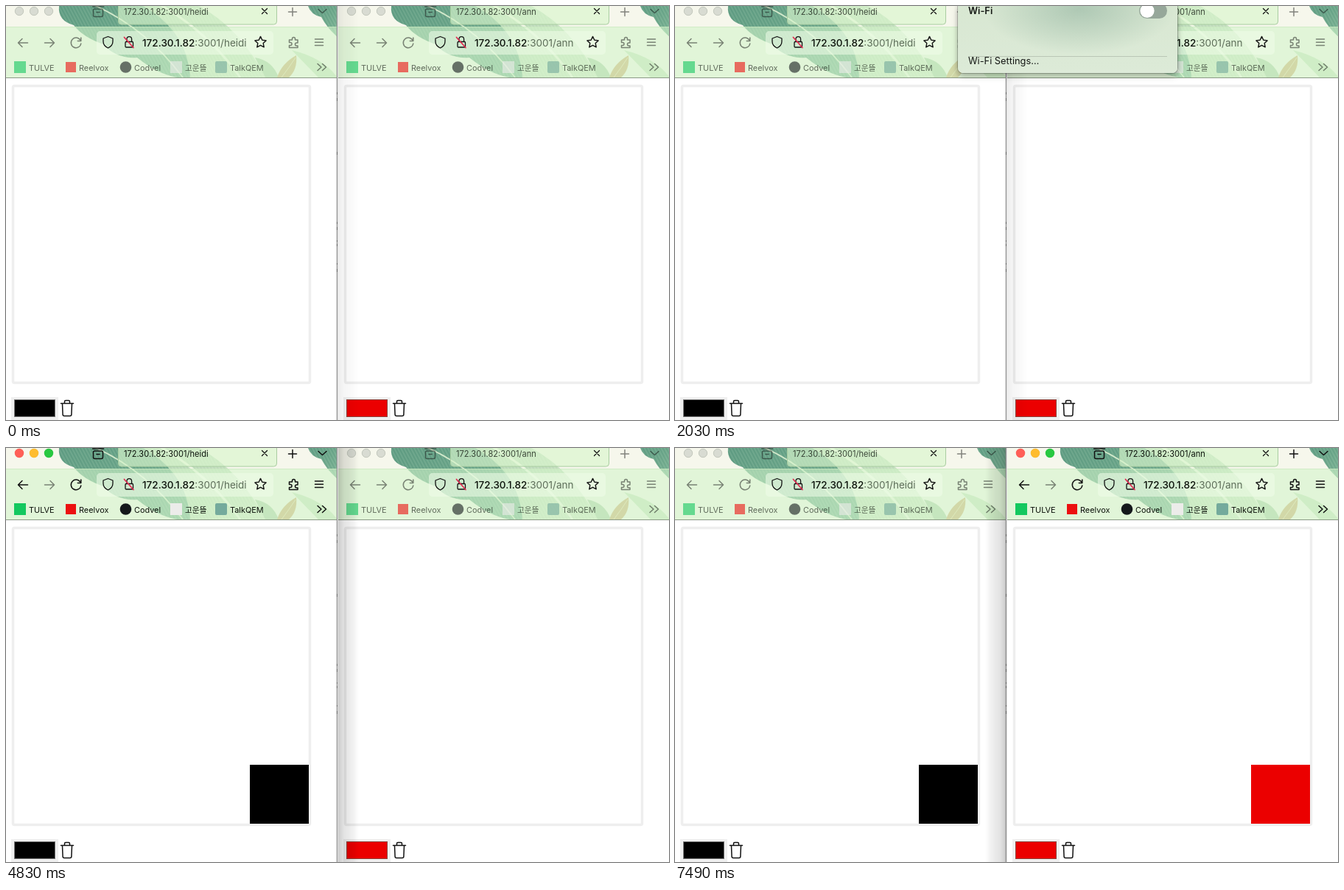
Recreate the animation shown at these times as an HTML page. Size 900 px wide and 562 px high, loop 8 s.

```html
<!DOCTYPE html>
<html lang="en">
<head>
<meta charset="utf-8">
<title>Shared pixel board</title>
<style>
@property --on { syntax: "<number>"; inherits: true; initial-value: 0; }

html, body { margin: 0; width: 900px; height: 562px; overflow: hidden; background: #fff; }
body { position: relative; font-family: Inter, "Noto Sans CJK KR", "Noto Sans CJK", sans-serif; }
svg { display: block; }
text { white-space: pre; }
#stage, .board, .shade, #menu, #foot { position: absolute; }
#stage { left: 0; top: 0; }

.line { fill: none; stroke: #111; stroke-width: 1.5; stroke-linecap: round; stroke-linejoin: round; }
.thin { stroke-width: 1.3; }
.chrome { opacity: calc(.5 + .5 * var(--on)); }
.mark { opacity: calc(.6 + .4 * var(--on)); }
.title { opacity: calc(.75 + .25 * var(--on)); }
.lit { opacity: var(--on); }
.win text { fill: #0c120b; }
.win .soft { fill: #5d6d59; font-weight: 400; }

.left { animation: leftFocus 8s linear infinite; }
.right { animation: rightFocus 8s linear infinite; }
@keyframes leftFocus {
  0%, 33.25% { --on: 0; }
  35.875%, 74.375% { --on: 1; }
  76.125%, 100% { --on: 0; }
}
@keyframes rightFocus {
  0%, 74.375% { --on: 0; }
  76.125%, 100% { --on: 1; }
}

/* Window shadows falling on the neighbour */
.shade { top: 0; width: 28px; height: 562px; }
.onRight { left: 451px; background: linear-gradient(90deg, #0003, #0000001c 28%, #0000000f 70%, #0000); animation: onRight 8s linear infinite; }
.onLeft { left: 421px; background: linear-gradient(270deg, #0003, #0000001c 28%, #0000000f 70%, #0000); animation: onLeft 8s linear infinite; }
@keyframes onRight {
  0%, 33.25% { opacity: .35; }
  35.875%, 72.624% { opacity: 1; }
  72.625%, 100% { opacity: 0; }
}
@keyframes onLeft {
  0%, 72.624% { opacity: 0; }
  72.625% { opacity: .4; }
  76.125%, 100% { opacity: 1; }
}

/* Painted cells, 40px each */
.board { top: 430px; width: 80px; height: 80px; }
.black { left: 331px; background: #000; animation: paintBlack 8s step-end infinite; }
.red { left: 782px; background: #eb0000; animation: paintRed 8s step-end infinite; }
@keyframes paintBlack {
  0% { clip-path: inset(0 80px 80px 0); }
  46.375% { clip-path: inset(0 40px 40px 0); }
  51.625% { clip-path: inset(0 40px 0 0); }
  56% { clip-path: polygon(0 0, 40px 0, 40px 40px, 80px 40px, 80px 80px, 0 80px); }
  60.375%, 100% { clip-path: inset(0); }
}
@keyframes paintRed {
  0% { clip-path: inset(0 80px 80px 0); }
  80.5% { clip-path: inset(0 40px 40px 0); }
  84% { clip-path: inset(0 40px 0 0); }
  89.25% { clip-path: polygon(0 0, 40px 0, 40px 40px, 80px 40px, 80px 80px, 0 80px); }
  93.625%, 100% { clip-path: inset(0); }
}

/* Network menu */
#menu {
  left: 384px; top: 0; width: 298px; overflow: hidden; border-radius: 0 0 7px 7px;
  background:
    radial-gradient(130px 62px at 165px 4px, #aec8b4, #aec8b400) no-repeat,
    linear-gradient(#d8e7d2, #dceAd7 85px, #ececec 140px);
  box-shadow: 0 0 0 1px #00000038, 0 4px 9px #00000040, 0 3px 3px 4px #0000000a;
  animation: menuSize 8s linear infinite, menuShow 8s linear infinite;
}
#menu text { font-size: 12.8px; fill: #141714; }
#menu .head { font-size: 12px; font-weight: 600; fill: #6d776b; }
#foot { left: 0; bottom: 0; }
.sep { stroke: #00000026; stroke-width: 1; }
#body { animation: bodyFade 8s linear infinite; }
#spot { animation: spotIn 8s linear infinite; }
#known { animation: knownMove 8s linear infinite; }
#footSep { animation: footSep 8s linear infinite; }
#track { animation: track 8s linear infinite; }
#knob { animation: knob 8s linear infinite; }
@keyframes menuShow {
  0%, 13.124% { opacity: 0; }
  13.125%, 29.75% { opacity: 1; }
  32.375%, 100% { opacity: 0; }
}
@keyframes menuSize {
  0% { height: 212px; }
  15.75% { height: 212px; animation-timing-function: cubic-bezier(.65, 0, .35, 1); }
  20.125% { height: 276px; }
  22.75% { height: 276px; animation-timing-function: cubic-bezier(.65, 0, .35, 1); }
  26.75%, 100% { height: 56px; }
}
@keyframes knownMove {
  0% { transform: none; }
  15.75% { transform: none; animation-timing-function: cubic-bezier(.65, 0, .35, 1); }
  20.125%, 100% { transform: translateY(65px); }
}
@keyframes spotIn {
  0%, 17% { opacity: 0; }
  20.125%, 100% { opacity: 1; }
}
@keyframes bodyFade {
  0%, 22.75% { opacity: 1; }
  24.8%, 100% { opacity: 0; }
}
@keyframes footSep {
  0%, 22.75% { transform: none; }
  24.5%, 25.5% { transform: translateY(10px); }
  26.75%, 100% { transform: none; }
}
@keyframes track {
  0%, 22.75% { fill: #0a7cff; }
  24.5%, 100% { fill: #96a79a; }
}
@keyframes knob {
  0%, 18% { transform: none; fill: #fff; }
  20.5%, 22.75% { transform: none; fill: #e6e9ee; }
  24.5%, 100% { transform: translateX(-16px); fill: #fff; }
}
</style>
</head>
<body>
<svg id="stage" width="900" height="562">
  <defs>
    <linearGradient id="deep" x2="1" y2="1">
      <stop stop-color="#5f9c83"/><stop offset=".5" stop-color="#6ba68a"/><stop offset="1" stop-color="#7db597"/>
    </linearGradient>
    <linearGradient id="pale" x2="1" y2="1">
      <stop stop-color="#b5d6b6"/><stop offset="1" stop-color="#d9ebcd"/>
    </linearGradient>
    <pattern id="veins" width="4" height="4" patternUnits="userSpaceOnUse" patternTransform="rotate(62)">
      <path d="M0 1H4" stroke="#e6f3dc" stroke-opacity=".2"/>
      <path d="M0 3H4" stroke="#24604c" stroke-opacity=".08"/>
    </pattern>
    <path id="leaf" d="M72 0H186Q246 34 250 97H232Q205 92 178 70Q150 72 132 52Q104 42 92 26Q70 20 72 0Z"/>
    <path id="broad" d="M180 0H262Q318 30 352 97H240Q262 62 180 0Z"/>
    <path id="corner" d="M410 0H450V42Q436 30 428 15Q414 12 410 0Z"/>
  </defs>
  <g id="windows"></g>
  <path d="M449.5 0V562" stroke="#979797" stroke-width="1.6"/>
  <path d="M449.5 117v3m0 5v4m0 69v4m0 91v3m0 4v4m0 14v2m0 3v3m0 23v2m0 6v4" stroke="#6a6a6a"/>
</svg>
<div class="shade onRight"></div>
<div class="shade onLeft"></div>
<div class="board black"></div>
<div class="board red"></div>

<div id="menu">
  <svg width="298" height="276">
    <text x="14" y="11" font-weight="600">Wi-Fi</text>
    <rect id="track" x="246" y="-4" width="38" height="21" rx="10.5"/>
    <circle id="knob" cx="273" cy="6.5" r="9.6"/>
    <g id="body">
      <text x="14" y="38">Weak Security (WPA)…</text>
      <path d="M276.5 28.5l5.5 10h-11z" fill="#4f574e" stroke="#4f574e" stroke-width="1.5" stroke-linejoin="round"/>
      <path d="M276.5 31v4m0 1.5v1.3" stroke="#e4ebe1" stroke-width="1.3"/>
      <path class="sep" d="M14 49.5H284"/>
      <g id="spot">
        <text class="head" x="14" y="70">Personal Hotspot</text>
        <circle cx="27" cy="93" r="13" fill="#c9d2c7"/>
        <g class="line thin">
          <rect x="18" y="89" width="11" height="7" rx="3.5"/>
          <rect x="25" y="90.5" width="11" height="7" rx="3.5"/>
        </g>
        <text x="48" y="98">Doyu</text>
        <path d="M217.5 98v-4" stroke="#7e867d" stroke-width="3"/>
        <path d="M222.5 98v-6m4.5 6v-8m4.5 8v-10" stroke="#bcc4ba" stroke-width="3"/>
        <text x="239" y="97" style="font-size:10.8px;fill:#7e867d">LTE</text>
        <rect x="262.5" y="88.5" width="17" height="9" rx="2.5" fill="none" stroke="#838b82"/>
        <rect x="264" y="90" width="10" height="6" rx="1" fill="#646c63"/>
        <path d="M281.5 91.5v3" stroke="#838b82" stroke-width="1.5"/>
        <path class="sep" d="M14 114.5H284"/>
      </g>
      <g id="known"></g>
    </g>
  </svg>
  <svg id="foot" width="298" height="34">
    <path id="footSep" class="sep" d="M14 1.5H284"/>
    <text x="14" y="21.5">Wi-Fi Settings…</text>
  </svg>
</div>

<script>
const wifi = (y, disc, ink) => `
  <circle cx="27" cy="${y}" r="13" fill="${disc}"/>
  <g transform="translate(27 ${y + 4.5})" fill="none" stroke="${ink}" stroke-width="2">
    <path d="M-7.2 -6.2Q0 -12.5 7.2 -6.2M-4.3 -3.2Q0 -7 4.3 -3.2"/>
    <path d="M-1.9 -1.2Q0 -3 1.9 -1.2L0 .8Z" fill="${ink}" stroke="none"/>
  </g>`;

document.getElementById('known').innerHTML = `
  <text class="head" x="14" y="70">Known Networks</text>
  ${wifi(93, '#cdd2cb', '#222')}
  <text x="48" y="98">fibnet</text>
  ${wifi(125, '#0a7cff', '#fff')}
  <text x="48" y="130">HB_NoVA_5G_Crest4_7316</text>
  <rect x="272" y="124" width="9" height="7.5" rx="1.2" fill="#6e6e6e"/>
  <path d="M274 124v-2q0-2.500 2.500-2.500t2.500 2.500v2" fill="none" stroke="#6e6e6e" stroke-width="1.4"/>
  <path class="sep" d="M14 146.5H284M14 179.5H284"/>
  <text class="head" x="14" y="167">Other Networks</text>
  <path d="M278 159l4.500 4.500-4.500 4.500" fill="none" stroke="#555" stroke-width="1.4"/>`;

const veined = (id, fill) => `<use href="#${id}" fill="url(#${fill})"/><use href="#${id}" fill="url(#veins)"/>`;

const art = `
  <rect width="450" height="97" fill="#f6f7ec"/>
  ${veined('broad', 'pale')}
  <path d="M205 -4Q275 35 318 97" fill="none" stroke="#f1f7e6" stroke-width="3"/>
  ${veined('leaf', 'deep')}
  <path d="M118 -2Q190 30 240 97" fill="none" stroke="#d3e9cb" stroke-width="1.8"/>
  ${veined('corner', 'deep')}
  <path d="M338 70Q362 74 370 97H352Z" fill="#b4d3af"/>
  <path d="M368 97Q374 78 394 67Q396 86 384 97Z" fill="#d2b27a"/>
  <path d="M374 97Q384 84 393 70" fill="none" stroke="#ecdcae"/>
  <path d="M388 60Q430 70 450 97H424Z" fill="#cce4c2"/>
  <rect y="28" width="450" height="69" fill="#d3f5ca" fill-opacity=".58"/>
  <path d="M0 28.5H450" stroke="#c9e8bf" stroke-opacity=".7"/>
  <rect x="152.5" y="-6" width="215" height="31" rx="4" fill="#d9f6ce" fill-opacity=".66" stroke="#a9cda1"/>
  <rect x="123" y="34" width="240" height="32" rx="5" fill="#f1fdea" fill-opacity=".55"/>`;

const lights = ['#ff5f57', '#febc2e', '#28c840'].map((c, i) => `
  <circle cx="${18 + 20 * i}" cy="7" r="5.7" fill="#d8dbd2" stroke="#c3c8bd"/>
  <circle class="lit" cx="${18 + 20 * i}" cy="7" r="6.2" fill="${c}"/>`).join('');

const star = Array.from({ length: 10 }, (_, i) => {
  const r = i % 2 ? 3.9 : 8, a = Math.PI * (i / 5 - .5);
  return `${(345.5 + r * Math.cos(a)).toFixed(1)},${(49.4 + r * Math.sin(a)).toFixed(1)}`;
}).join(' ');

const icons = `
  <g class="chrome line">
    <rect x="118.5" y="4" width="13" height="10.5" rx="2"/>
    <path d="M117.5 1h15M123 8.5h4M383.5 8h11M389 2.5v11M424 4.5l5.5 5 5.5-5"/>
    <path d="M29.5 50h-13m5.5-5.5L16.5 50l5.5 5.5"/>
    <path d="M101 46.5a6.800 6.800 0 1 0 .8 4.500M101.8 43v4.500h-4.500"/>
    <path d="M384.5 46h4v-1.500a2 2 0 0 1 4 0V46h3.500v4h-1.500a2 2 0 0 0 0 4h1.500v2.500h-11.500v-3h1.500a2 2 0 0 0 0-4h-1.500z"/>
    <path d="M419.5 45h11m-11 4.200h11m-11 4.200h11M423 78.5l5 4.500-5 4.500M429.5 78.5l5 4.500-5 4.500"/>
  </g>
  <path class="line" opacity=".5" d="M52.5 50h13m-5.500-5.500l5.500 5.500-5.500 5.500"/>
  <g class="line thin">
    <path d="M347.5 3.5l7 7m0-7l-7 7"/>
    <path d="M138.5 41.5l6.500 2.500v4q0 6-6.500 9-6.500-3-6.500-9v-4z"/>
    <rect x="162" y="48.5" width="10.5" height="7.5" rx="1.2"/>
    <path d="M164 48v-3q0-3.300 3.300-3.300t3.300 3.300v3"/>
    <path d="M160.5 42.5l12.500 14" stroke="#e22850" stroke-width="1.7"/>
    <polygon points="${star}" stroke-width="1.4"/>
  </g>`;

const marks = `
  <g class="mark" font-size="10.9">
    <rect x="11" y="75" width="16" height="16" fill="#14c85f"/><text x="31" y="87.5">TULVE</text>
    <rect x="81" y="76" width="14" height="14" fill="#ec1010"/><text x="99" y="87.5">Reelvox</text>
    <circle cx="162.5" cy="83" r="7.8" fill="#14181b"/><text x="174" y="87.5">Codvel</text>
    <rect x="223" y="75" width="16" height="16" fill="#ececea"/><text x="243" y="87.5" font-size="10.7">고운뜰</text>
    <rect x="284" y="75" width="16" height="16" rx="2" fill="#74aa9c"/><text x="304" y="87.5">TalkQEM</text>
  </g>`;

const host = '172.30.1.82';
const page = (ink, edge) => `
  <rect x="9.5" y="108.5" width="403" height="403" rx="2" fill="#fff" stroke="#eee" stroke-width="3.5"/>
  <rect x="7" y="531" width="64" height="31" fill="#efefef"/>
  <rect x="11.5" y="534.5" width="55" height="23" fill="${ink}" stroke="${edge}"/>
  <path class="line" d="M74.5 539.500h17M79.500 539v-2q0-1.500 1.500-1.500h4q1.500 0 1.500 1.500v2M76.500 540l.6 14.500q.1 2 2 2h7.800q1.900 0 2-2l.6-14.500"/>`;

const browser = (side, x, user, ink, edge) => `
  <g class="win ${side}" transform="translate(${x} 0)">
    <svg width="449" height="97">${art}</svg>
    <path d="M0 97.5H449" stroke="#8b9a86"/>
    ${lights}${icons}${marks}
    <text class="title" x="160" y="12" font-size="11.05">${host}:3001/${user}</text>
    <text x="185" y="54.5" font-size="13.5" font-weight="500">${host}<tspan class="soft">:3001/${user}</tspan></text>
    ${page(ink, edge)}
  </g>`;

document.getElementById('windows').innerHTML =
  browser('left', 0, 'heidi', '#000', '#777') + browser('right', 451, 'ann', '#eb0000', '#8e4038');
</script>
</body>
</html>
```
